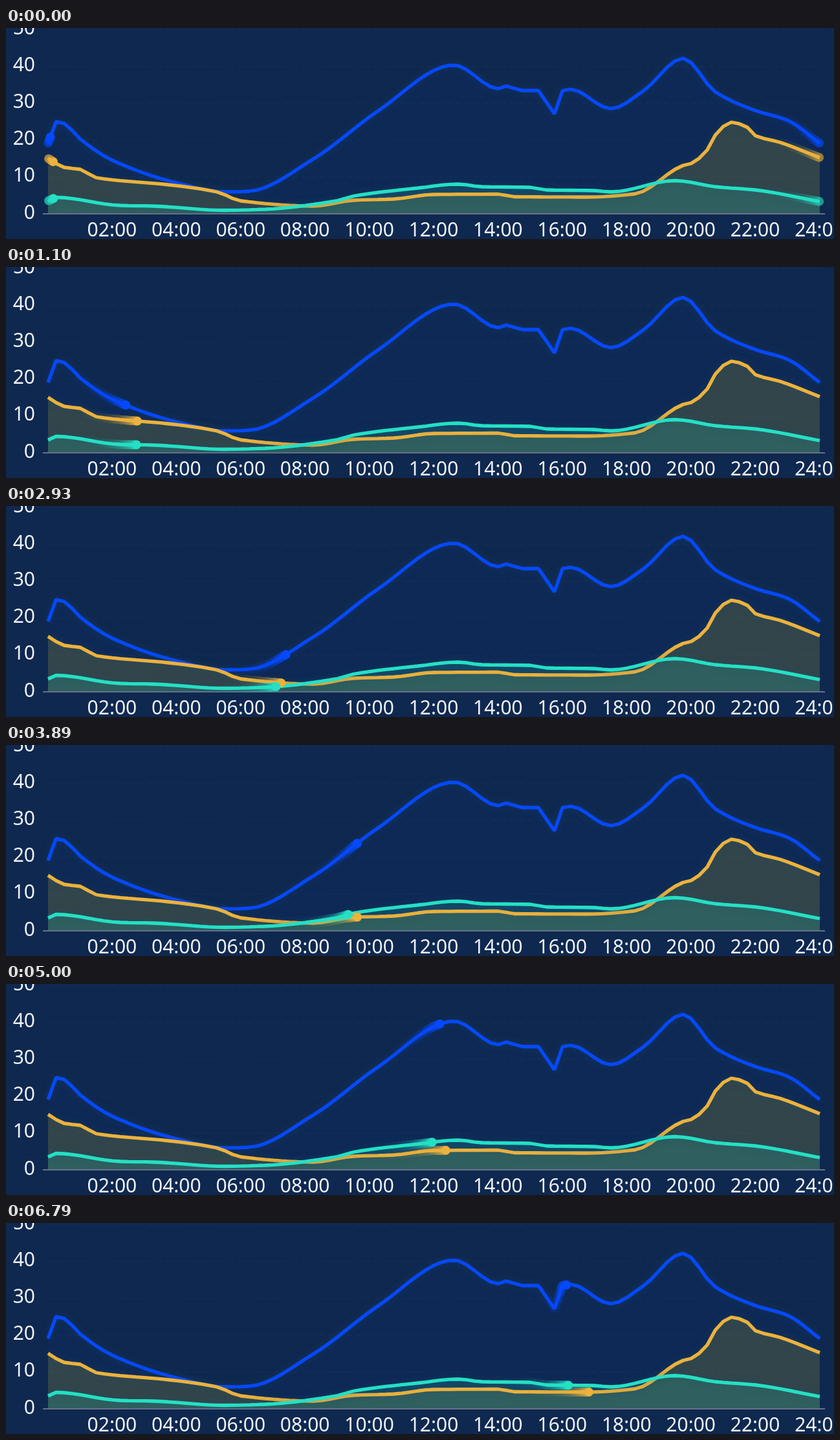
These frames come from a looping animation (1280 by 327 pixels, 6860 ms). An HTML page with a canvas:

```html
<!DOCTYPE html>
<html lang="en">
<head>
<meta charset="utf-8">
<title>Daily curves</title>
<style>
  html, body { margin: 0; width: 100%; height: 100%; overflow: hidden; background: #0f284f; }
  canvas { position: absolute; left: 0; top: 0; }
</style>
</head>
<body>
<canvas id="chart" width="1280" height="327"></canvas>
<canvas id="trails" width="1280" height="327"></canvas>
<script>
const LOOP = 6860, PASS = 10200, LEAD = 75;   // ms: loop, one run along a curve, head start
const TICK = 1000 / 60, FADE = 0.91, TAIL = 45, RADIUS = 7;
const LEFT = 65, STEP = 1193 / 96, BASE = 288, DECADE = 57.1;

// Knots: [quarter-hour index, height on the stage]
const series = [
  { color: 'rgb(5,73,255)', fill: 'rgba(5,73,255,.04)', knots: [
    [0, 179], [1, 145], [2, 148], [4, 172], [8, 205], [16, 240], [22, 254], [25, 253],
    [33, 203], [41, 129], [50.5, 57.5], [56, 94], [57, 90], [59, 97], [61, 97], [63, 133],
    [64, 97], [65, 95], [70, 125], [74, 98], [79, 47], [83, 99], [88, 128], [92, 143], [96, 179]] },
  { color: 'rgb(236,178,60)', fill: 'rgba(194,180,30,.2)', knots: [
    [0, 202], [2, 216], [4, 219], [6, 232], [15, 243], [21, 254], [24, 268], [33, 276],
    [38, 267], [43, 265], [48, 258], [56, 257.5], [58, 261.5], [67, 262], [73, 257], [79, 213],
    [80, 210], [82, 189], [83, 166], [85, 146], [87, 154], [88, 167], [91, 177], [96, 201]] },
  { color: 'rgb(36,224,196)', fill: 'rgba(36,224,196,.165)', knots: [
    [0, 268], [1, 262.5], [9, 275], [13, 276], [22, 282.5], [27, 281], [36, 267.5],
    [38, 260.5], [46, 248], [51, 242], [54, 246], [60, 247], [62, 251], [68, 252],
    [70, 254], [78, 236.5], [83, 246], [88, 251], [96, 269]] }
];

const context = id => document.getElementById(id).getContext('2d');
const chart = context('chart'), trails = context('trails');

// Monotone cubic through the knots: no overshoot, flat at peaks.
function curve(knots) {
  const slopes = knots.slice(1).map(([x, y], i) => (y - knots[i][1]) / (x - knots[i][0]));
  const tangents = knots.map((_, i) => {
    const before = slopes[i - 1] ?? slopes[i], after = slopes[i] ?? before;
    return before * after > 0 ? 2 * before * after / (before + after) : 0;
  });
  return x => {
    const i = Math.max(0, knots.findIndex(k => k[0] >= x) - 1);
    const [x0, y0] = knots[i], [x1, y1] = knots[i + 1];
    const width = x1 - x0, u = (x - x0) / width, v = 1 - u;
    return y0 * v * v * (1 + 2 * u) + y1 * u * u * (1 + 2 * v)
      + width * u * v * (tangents[i] * v - tangents[i + 1] * u);
  };
}

for (const s of series) {
  const height = curve(s.knots);
  s.line = 'M' + Array.from({ length: 97 }, (_, i) => `${LEFT + i * STEP} ${height(i)}`).join('L');
  s.path = document.createElementNS('http://www.w3.org/2000/svg', 'path');
  s.path.setAttribute('d', s.line);
  s.length = s.path.getTotalLength();
}

function rule(y, x0, x1) {
  chart.beginPath();
  chart.moveTo(x0, y);
  chart.lineTo(x1, y);
  chart.stroke();
}

function drawChart() {
  chart.fillStyle = '#0f284f';
  chart.fillRect(0, 0, 1280, 327);

  chart.lineWidth = 2;
  chart.strokeStyle = 'rgba(50,85,95,.12)';
  chart.setLineDash([8, 6]);
  for (let n = 1; n <= 5; n++) rule(BASE - n * DECADE, LEFT, 1258);
  chart.setLineDash([]);

  for (const s of series) {
    chart.fillStyle = s.fill;
    chart.fill(new Path2D(`${s.line}V${BASE}H${LEFT}Z`));
  }
  chart.strokeStyle = '#66728a';
  rule(BASE, 57, 1266);

  chart.lineWidth = 5.3;
  chart.lineJoin = 'bevel';
  chart.shadowColor = 'rgba(30,80,110,.4)';
  chart.shadowBlur = 12;
  for (const s of series) {
    chart.strokeStyle = s.color;
    chart.stroke(new Path2D(s.line));
  }
  chart.shadowColor = 'transparent';

  chart.font = '500 30px "Noto Sans", "Open Sans", sans-serif';
  chart.fillStyle = '#f0f3f8';
  chart.textAlign = 'right';
  for (let n = 0; n <= 5; n++) chart.fillText(n * 10, 45, BASE + 7.5 - n * DECADE);
  chart.textAlign = 'center';
  for (let h = 2; h <= 24; h += 2)
    chart.fillText(String(h).padStart(2, '0') + ':00', LEFT - 0.5 + h * 4 * STEP, 322.5);
}

// Each dot replaces what lies under it, so the newest one always shows.
function drawDot(s, elapsed, alpha) {
  const progress = (elapsed / PASS + 1) % 1;
  const { x, y } = s.path.getPointAtLength(progress * s.length);
  trails.beginPath();
  trails.arc(x, y, RADIUS, 0, 2 * Math.PI);
  trails.fillStyle = s.color;
  trails.globalAlpha = 1;
  trails.globalCompositeOperation = 'destination-out';
  trails.fill();
  trails.globalAlpha = alpha;
  trails.globalCompositeOperation = 'source-over';
  trails.fill();
}

function frame() {
  const elapsed = performance.now() % LOOP + LEAD;
  trails.clearRect(0, 0, 1280, 327);
  for (let age = TAIL; age >= 0; age--)
    for (const s of series) drawDot(s, elapsed - age * TICK, FADE ** age);
  requestAnimationFrame(frame);
}

drawChart();
frame();
</script>
</body>
</html>
```
